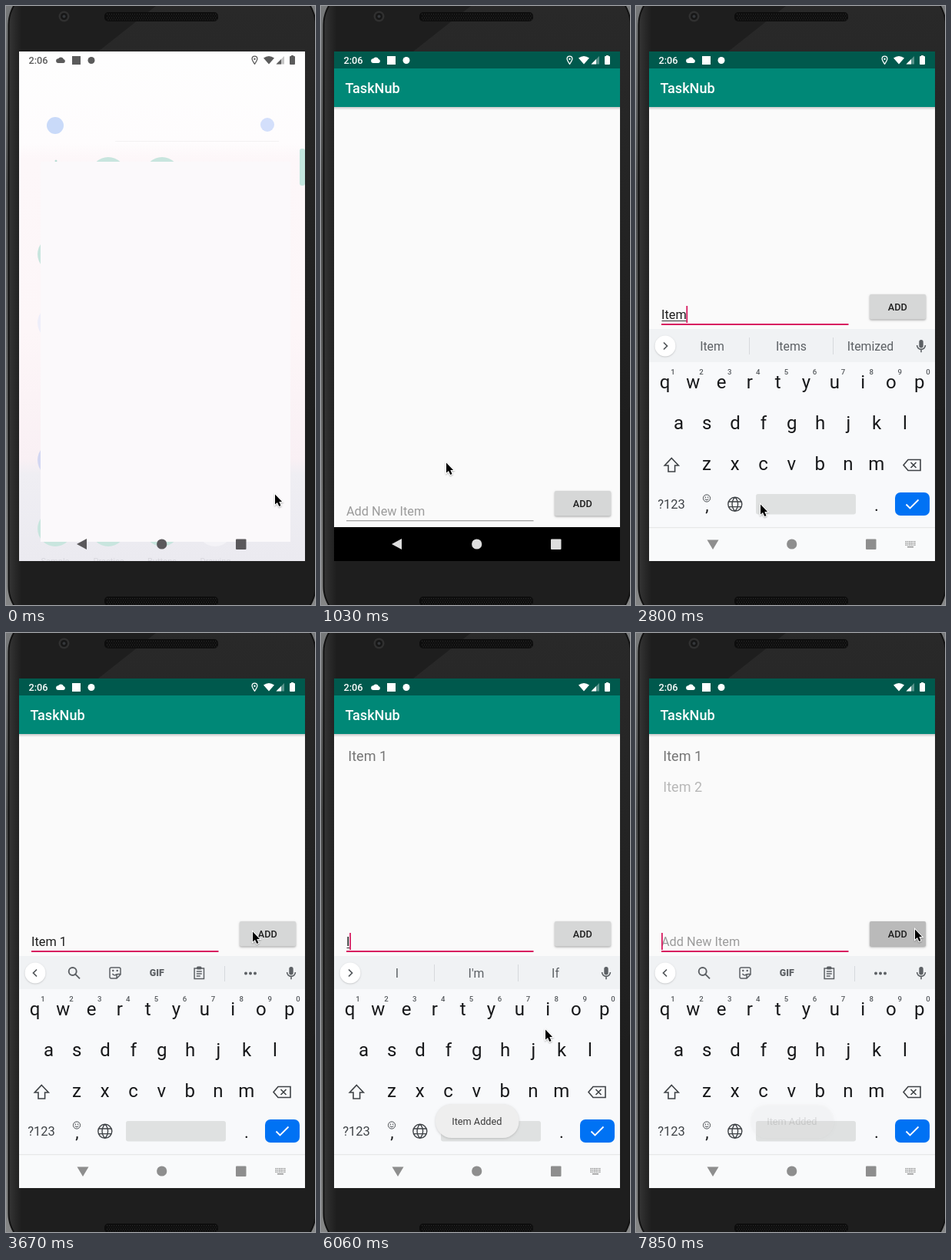
Write an HTML page with a canvas that moves like this. It is 402 by 777 pixels and loops after 8 s.

```html
<!DOCTYPE html>
<html lang="en">
<head>
<meta charset="utf-8">
<title>To-do list on a phone</title>
<style>
html, body { margin: 0; width: 100%; height: 100%; overflow: hidden; background: #1d1d1d; }
canvas { display: block; width: 402px; height: 777px; }
</style>
</head>
<body>
<canvas id="stage"></canvas>
<script>
const W = 402, H = 777, LOOP = 8000;
const canvas = document.getElementById('stage');
const ctx = canvas.getContext('2d');
const ratio = window.devicePixelRatio || 1;
canvas.width = W * ratio;
canvas.height = H * ratio;

const PINK = '#d81b60', KEY = '#17181a', ICON = '#5c6064';

// pointer path: step, x, y
const POINTER = [
  [0, 349.5, 633], [2, 349.5, 633], [5, 190, 596], [7, 162.5, 592], [8, 162, 620],
  [9, 161.5, 646], [20, 161.5, 646], [22, 240, 520], [24, 326, 392], [25, 320.5, 387],
  [28, 320.5, 387], [30, 316, 400], [32, 309.5, 438], [34, 300, 500], [36, 292, 551],
  [38, 291.5, 514], [47, 291.5, 514], [49, 385, 405], [50, 392, 390], [51, 370, 385], [52, 362.5, 384]
];

// what the field holds from each step on
const TYPED = [
  [17, 'I'], [18, 'It'], [19, 'Item'], [20, 'Item '], [21, 'Item 1'], [27, ''],
  [41, 'I'], [42, 'It'], [43, 'Ite'], [44, 'Item'], [45, 'Item '], [46, 'Item 2'], [53, '']
];

const SUGGEST = {
  I: ['I', "I'm", 'If'],
  It: ['It', "It's", 'Its'],
  Ite: ['Ite', 'Item', 'Items'],
  Item: ['Item', 'Items', 'Itemized']
};

function rect(x, y, w, h, color, r = 0) {
  ctx.fillStyle = color;
  ctx.beginPath();
  ctx.roundRect(x, y, w, h, r);
  ctx.fill();
}

function circle(x, y, r, color) {
  ctx.fillStyle = color;
  ctx.beginPath();
  ctx.arc(x, y, r, 0, Math.PI * 2);
  ctx.fill();
}

function fillPath(d, x, y, color) {
  ctx.save();
  ctx.translate(x, y);
  ctx.fillStyle = color;
  ctx.fill(new Path2D(d));
  ctx.restore();
}

function strokePath(d, x, y, color, width = 1.6) {
  ctx.save();
  ctx.translate(x, y);
  ctx.strokeStyle = color;
  ctx.lineWidth = width;
  ctx.stroke(new Path2D(d));
  ctx.restore();
}

function text(s, x, y, size, color, align = 'left', weight = 400) {
  ctx.font = `${weight} ${size}px Roboto, sans-serif`;
  ctx.textAlign = align;
  ctx.fillStyle = color;
  ctx.fillText(s, x, y);
}

function withAlpha(a, draw) {
  if (a <= 0) return;
  ctx.save();
  ctx.globalAlpha = a;
  draw();
  ctx.restore();
}

function withShadow(color, blur, dy, draw) {
  ctx.save();
  ctx.shadowColor = color;
  ctx.shadowBlur = blur * ratio;
  ctx.shadowOffsetY = dy * ratio;
  draw();
  ctx.restore();
}

function gradient(x0, y0, x1, y1, ...stops) {
  const g = ctx.createLinearGradient(x0, y0, x1, y1);
  stops.forEach(([at, color]) => g.addColorStop(at, color));
  return g;
}

function stepAt(t) {
  return t < 4710 ? Math.floor((t + 7) / 147) : 32 + Math.floor((t - 4710) / 149.5);
}

function pointerAt(k) {
  const i = POINTER.findIndex(p => p[0] > k);
  if (i < 0) return POINTER[POINTER.length - 1].slice(1);
  const [k0, x0, y0] = POINTER[i - 1], [k1, x1, y1] = POINTER[i];
  const f = (k - k0) / (k1 - k0);
  return [x0 + (x1 - x0) * f, y0 + (y1 - y0) * f];
}

function fieldAt(k) {
  let since = 10, value = '';
  for (const [at, s] of TYPED) if (at <= k) [since, value] = [at, s];
  const caret = k >= 10 && ((k - since) * 147) % 1000 < 500;
  return { value, caret };
}

// opacity of something that appears at step k0
const appear = (k, k0, first) => k < k0 ? 0 : k === k0 ? first : 1;

function drawGrille(y) {
  rect(128, y, 148, 12, '#0d0d0d', 5);
  for (let row = 0; row < 4; row++)
    for (let x = 131 + (row % 2) * 1.5; x < 274; x += 3)
      rect(x, y + 2 + row * 2.4, 1.2, 1.2, '#2b2b2b');
}

function drawPhone() {
  rect(0, 0, W, H, gradient(0, 0, 0, H, [0, '#77797a'], [0.3, '#4b4c4c'], [1, '#858686']));
  rect(2.5, -24, 401, 825, '#111', 48);
  rect(4.5, -22, 397, 821, gradient(4, 0, 20, 0, [0, '#343434'], [1, '#1e1e1e']), 46);
  ctx.save();
  ctx.beginPath();
  ctx.roundRect(4.5, -22, 397, 821, 46);
  ctx.clip();
  fillPath('M195 0H402V520L389 540V59H120Z', 0, 0,
    gradient(0, 0, 0, 540, [0, '#292929'], [1, '#1e1e1e']));
  ctx.restore();
  circle(75.5, 13.5, 7, '#303030');
  circle(75.5, 13.5, 4.5, '#171717');
  circle(75.5, 13.5, 2, '#34373a');
  drawGrille(8);
  drawGrille(766);
}

function drawStatus(color, pin) {
  text('2:06', 29.5, 75, 12.7, color, 'left', 500);
  fillPath('M3 9H9.5A2.6 2.6 0 0 0 10 3.9A4 4 0 0 0 3 3.2A2.9 2.9 0 0 0 3 9Z', 65, 65, color);
  rect(86, 65, 11, 11, color);
  circle(111, 70.5, 4.5, color);
  if (pin) {
    strokePath('M0 5.2C-2.2 2 -3.4 .4 -3.4 -1.4A3.4 3.4 0 0 1 3.4 -1.4C3.4 .4 2.2 2 0 5.2Z', 323.5, 70, color, 1.3);
    circle(323.5, 68.7, 1.2, color);
  }
  fillPath('M0 2.6Q7 -2.4 14 2.6L7 10.5Z', 335, 65, color);
  withAlpha(0.35, () => fillPath('M10.5 0V10.5H0Z', 351.5, 65, color));
  fillPath('M6.5 4V10.5H0Z', 351.5, 65, color);
  rect(371, 64, 3, 2, color);
  rect(369, 65, 7, 11, color, 1);
}

function drawNav(color, keyboard) {
  if (keyboard) {
    fillPath('M-7.5 -5.5H7.5L0 7Z', 100, 698, color);
    for (let r = 0; r < 3; r++)
      for (let c = 0; c < 6; c++) rect(350.5 + c * 2.3, 694 + r * 2.3, 1.4, 1.4, color);
    rect(353, 701, 8, 1.4, color);
  } else {
    fillPath('M6 -7V7L-7 0Z', 99, 698, color);
  }
  circle(202.7, 698, 6.6, color);
  rect(299, 691.5, 13.5, 13.5, color, 1);
}

function drawLauncher() {
  rect(17, 59, 372, 661, gradient(0, 59, 0, 720,
    [0, '#fefefe'], [0.18, '#fefcfd'], [0.21, '#fdf7f9'], [0.55, '#fdf6f8'],
    [0.8, '#f9f0f4'], [0.83, '#efeef3'], [1, '#ebeaf0']));
  rect(142, 175, 213, 1, '#f3f1f2');
  circle(64, 155, 11, '#c9daf9');
  circle(340, 154, 9, '#d3dffb');
  rect(382, 185, 7, 48, '#c3e6de', 3);
  circle(65, 201, 1.5, '#b9ddd5');
  const teal = '#c8e5de';
  [[133, 219], [203, 219], [64, 322], [64, 678], [133, 678], [203, 678]]
    .forEach(([x, y]) => circle(x, y, 23, teal));
  circle(64, 411, 23, '#eeeefa');
  circle(64, 589, 23, '#d3d7f2');
  circle(272, 678, 23, '#f4f3f7');
  ['Sample', 'Practice', 'Buttons', 'Drawing']
    .forEach((s, i) => text(s, 64 + i * 69.5, 724, 11, '#d8d7de', 'center'));
  rect(45, 202, 325, 493, '#fbf9fb');
  drawStatus('#5b5b5b', true);
  drawNav('#5a585b', false);
}

function drawEntry(k, raised) {
  const top = raised ? 0 : 255;
  const focused = k >= 10;
  const { value, caret } = fieldAt(k);
  const y = 406 + top;
  text(value || 'Add New Item', 33, y, 16.3, value ? '#1c1c1c' : '#9b9b9b');
  const end = 33 + (value ? ctx.measureText(value).width : 0);
  if (SUGGEST[value]) rect(33.5, y + 2, end - 33.5, 1, '#333');
  if (caret) rect(end - (value ? 0.3 : 0), 389 + top, 1.8, 22, PINK);
  if (focused) rect(33, 412 + top, 243.5, 2, PINK);
  else rect(33, 412.3 + top, 243.5, 1, '#8a8a8a');

  const pressed = k === 26 || k === 27 || k >= 52;
  withShadow('rgba(0,0,0,.35)', 2.5, 1, () =>
    rect(304, 374 + top, 73, 32.5, pressed ? '#bababa' : '#d6d7d7', 2));
  text('ADD', 340.3, 394.7 + top, 12.7, '#202020', 'center', 500);
}

function drawToolbar(value) {
  rect(17, 419, 372, 43, '#f0f2f4');
  withShadow('rgba(0,0,0,.2)', 2, 0.7, () => circle(38, 441, 13.5, '#fff'));
  const words = SUGGEST[value];
  strokePath(words ? 'M-2 -4.5L2.5 0L-2 4.5' : 'M2 -4.5L-2.5 0L2 4.5', 38, 441, '#505458', 1.7);
  if (words) {
    words.forEach((s, i) => text(s, 99 + i * 103, 447, 15.8, ICON, 'center'));
    rect(147, 430, 1, 22, '#d6d9dc');
    rect(256, 430, 1, 22, '#d6d9dc');
  } else {
    strokePath('M3.2 -2A5 5 0 1 1 -6.8 -2A5 5 0 1 1 3.2 -2ZM2 1.8L7.5 7.3', 88.5, 441, ICON, 1.9);
    strokePath('M-5 -7H5Q7 -7 7 -5V2L2 7H-5Q-7 7 -7 5V-5Q-7 -7 -5 -7ZM7 1.5H3.5Q2 1.5 2 3V7M-3.5 1Q-1 4.5 2 1.5', 142, 441, ICON, 1.5);
    circle(139.3, 438, 1.2, ICON);
    circle(144.7, 438, 1.2, ICON);
    text('GIF', 196.3, 445.3, 12.4, ICON, 'center', 900);
    strokePath('M-6.2 -6H6.2V7.5H-6.2ZM-3.5 -2H3.5M-3.5 1H3.5M-3.5 4H1.5', 251.3, 441, ICON, 1.5);
    rect(248, 432.5, 6.5, 4, ICON, 1.5);
    rect(284, 432, 1, 20, '#d6d9dc');
    [312, 318, 324].forEach(x => circle(x, 441.5, 2, ICON));
  }
  rect(368.3, 433, 5.4, 10.5, ICON, 2.7);
  strokePath('M-5.4 -1A5.4 5.4 0 0 0 5.4 -1M0 4.4V8.3', 371, 441, ICON, 1.6);
}

function drawKeys() {
  const row = (s, x, y) =>
    [...s].forEach((c, i) => text(c, x + i * 36.8, y, 24, KEY, 'center'));
  row('qwertyuiop', 37.5, 496);
  row('asdfghjkl', 55.5, 549);
  row('zxcvbnm', 92, 602);
  [...'1234567890'].forEach((c, i) => text(c, 48 + i * 36.9, 478, 9.6, '#55595d', 'center', 500));

  strokePath('M0 -9L9 .5H4.3V8.5H-4.3V.5H-9Z', 46.3, 595.5, '#3e4246', 1.6);
  strokePath('M-5 -7H11V7H-5L-11 0ZM-1.5 -3.5L5.5 3.5M5.5 -3.5L-1.5 3.5', 359, 595.5, '#3e4246', 1.6);

  text('?123', 46, 652, 16.5, '#3e4246', 'center');
  strokePath('M4.6 0A4.6 4.6 0 1 1 -4.6 0A4.6 4.6 0 1 1 4.6 0M-2.4 1Q0 3.8 2.4 1', 92, 638.5, '#4a4e52', 1);
  circle(90.4, 637.2, 0.8, '#4a4e52');
  circle(93.6, 637.2, 0.8, '#4a4e52');
  text(',', 92.5, 655, 22, KEY, 'center');
  strokePath('M9 0A9 9 0 1 1 -9 0A9 9 0 1 1 9 0M0 -9C5 -4 5 4 0 9C-5 4 -5 -4 0 -9M-8.2 -3.3H8.2M-8.2 3.3H8.2', 128.8, 646.3, '#3e4246', 1.4);
  rect(156, 633, 130, 26.5, '#dfe1e1', 3);
  text('.', 313, 655, 22, KEY, 'center');
  rect(337, 631, 45, 30, '#0072f4', 7);
  strokePath('M-8 0L-3 5L8 -6', 359.5, 646.5, '#fff', 1.8);
}

function drawKeyboard(value, drop) {
  ctx.save();
  ctx.translate(0, drop);
  rect(17, 419, 372, 301, '#f8f9fb');
  drawToolbar(value);
  drawKeys();
  ctx.restore();
}

function drawToast(alpha) {
  withAlpha(alpha, () => {
    withShadow('rgba(0,0,0,.16)', 3, 1, () => rect(149, 611, 108.5, 44, '#eeeeee', 21));
    text('Item Added', 202.8, 637.5, 12.7, '#3c3c3c', 'center');
  });
}

function drawApp(k) {
  const open = k >= 10;
  rect(17, 59, 372, 661, '#fafafa');
  rect(17, 131, 372, 4, gradient(0, 131, 0, 135, [0, 'rgba(0,0,0,.2)'], [1, 'rgba(0,0,0,0)']));
  rect(17, 59, 372, 22, '#00594d');
  rect(17, 81, 372, 50, '#008877');
  text('TaskNub', 31.5, 113, 18.1, '#fff', 'left', 500);
  drawStatus('#fff', k < 35);

  withAlpha(appear(k, 27, 0.5), () => text('Item 1', 35.3, 165.7, 18, '#757575'));
  withAlpha(appear(k, 53, 0.5), () => text('Item 2', 35.3, 206.4, 18, '#757575'));
  if (k >= 3) drawEntry(k, k >= 11);

  if (open) drawKeyboard(fieldAt(k).value, k === 10 ? 150 : k === 11 ? 40 : 0);
  rect(17, 676, 372, 44, open ? '#f9fafb' : '#000');
  if (open) rect(17, 676, 372, 1.2, '#e6e7e8');
  drawNav(open ? '#8e8e8e' : '#dedede', open);

  const fading = k < 43 ? 1 : k === 43 ? 0.5 : 0;
  drawToast(k < 53 ? appear(k, 27, 0.15) * fading : 0.15);
}

function drawPointer(k) {
  const [x, y] = pointerAt(k);
  const arrow = 'M.5 .5V13.6L3.5 10.9L5.8 16L8 15L5.8 10H9.6Z';
  withShadow('rgba(0,0,0,.3)', 2, 1, () => strokePath(arrow, x, y, '#fff', 2));
  fillPath(arrow, x, y, '#000');
}

function render(now) {
  const k = stepAt(now % LOOP);
  ctx.setTransform(ratio, 0, 0, ratio, 0, 0);
  drawPhone();
  ctx.save();
  ctx.beginPath();
  ctx.rect(17, 59, 372, 661);
  ctx.clip();
  if (k < 1) drawLauncher();
  else drawApp(k);
  ctx.restore();
  drawPointer(k);
}

const start = performance.now();
function tick() {
  render(performance.now() - start);
  requestAnimationFrame(tick);
}
tick();
</script>
</body>
</html>
```
